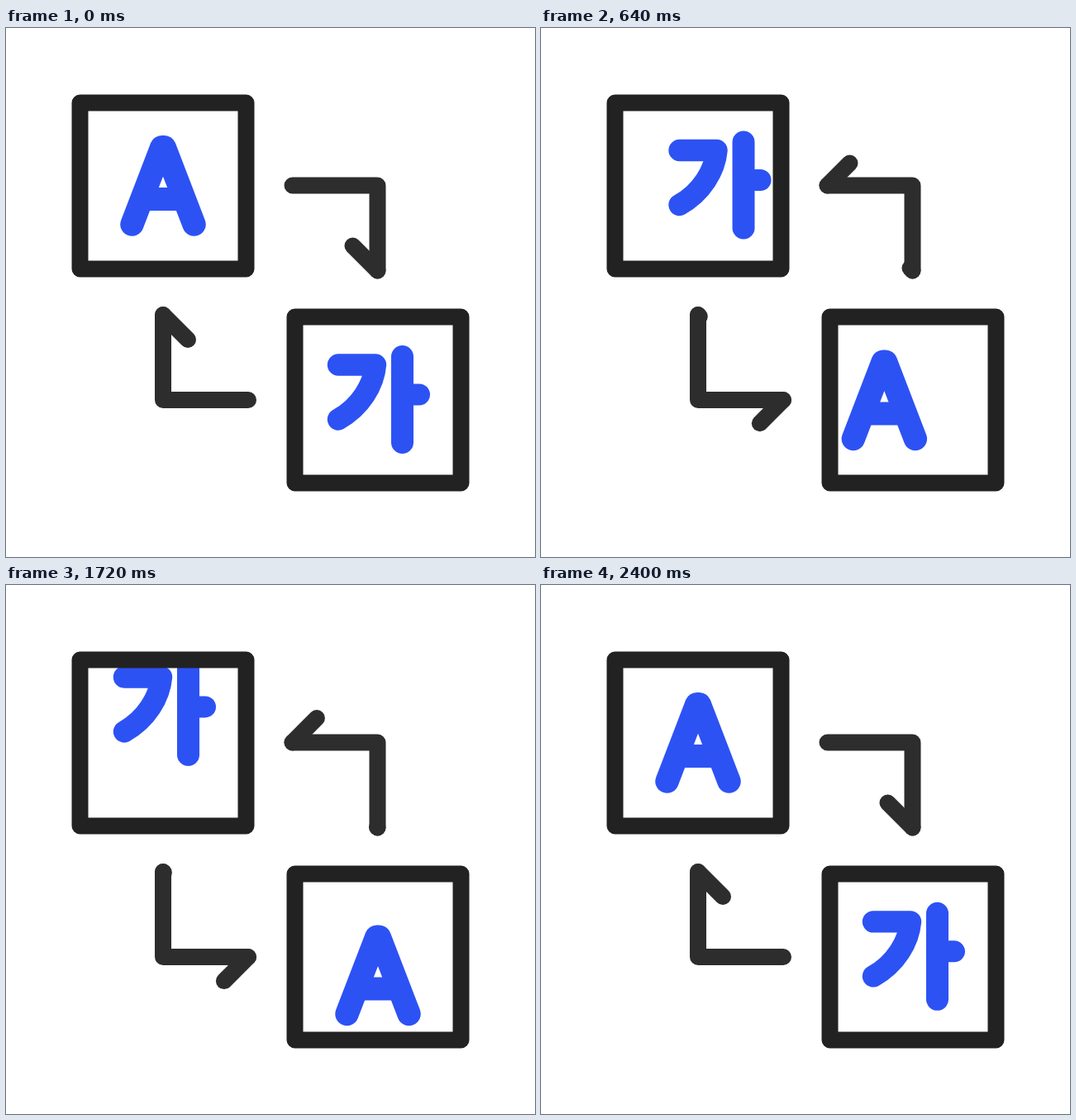
An HTML page with a canvas for the animation above (2800 ms loop, 640 by 640 pixels).

```html
<!DOCTYPE html>
<html lang="en">
<head>
<meta charset="utf-8">
<title>Translate</title>
<style>
html, body { margin: 0; width: 100%; height: 100%; overflow: hidden; background: #fff; }
canvas { display: block; width: 640px; height: 640px; }
</style>
</head>
<body>
<canvas id="stage" width="640" height="640"></canvas>
<script>
const ctx = document.getElementById('stage').getContext('2d');
const LOOP = 2800, STEP = 40;
const BLUE = '#2d52f4', FRAME = '#222222', ARROW = '#2d2d2d';

// Ease with control points (x1, 0) and (x2, 1), running from start to end
function ease(time, start, end, x1, x2) {
  const x = (time - start) / (end - start);
  if (x <= 0) return 0;
  if (x >= 1) return 1;
  let lo = 0, hi = 1;
  for (let i = 0; i < 30; i++) {
    const u = (lo + hi) / 2, v = 1 - u;
    if (3 * v * v * u * x1 + 3 * v * u * u * x2 + u * u * u < x) lo = u; else hi = u;
  }
  return lo * lo * (3 - 2 * lo);
}

function line(width, ...pts) {
  ctx.lineWidth = width;
  ctx.beginPath();
  for (let i = 0; i < pts.length; i += 2) ctx.lineTo(pts[i], pts[i + 1]);
  ctx.stroke();
}

function at(x, y, draw) {
  ctx.save();
  ctx.translate(x, y);
  draw();
  ctx.restore();
}

// Latin letter, placed by the middle of its top edge
function latin() {
  line(28.5, -37.5, 107.5, -1.6, 14.2, 1.6, 14.2, 37.5, 107.5);
  line(28, -16, 77, 16, 77);
}

// Hangul syllable, placed by the left end of its top stroke
function hangul() {
  ctx.lineWidth = 26.4;
  ctx.beginPath();
  ctx.moveTo(0, 0);
  ctx.lineTo(45, 0);
  ctx.bezierCurveTo(43, 24, 27, 51, 0, 66);
  ctx.stroke();
  line(27, 77.5, -10, 77.5, 94);
  line(26, 78, 36, 98, 36);
}

function box(x, y, drawLetters) {
  ctx.save();
  ctx.beginPath();
  ctx.rect(x, y, 201, 201);
  ctx.clip();
  ctx.strokeStyle = BLUE;
  drawLetters();
  ctx.restore();
  ctx.strokeStyle = FRAME;
  ctx.lineWidth = 20;
  ctx.strokeRect(x, y, 201, 201);
}

function head(x, y, dx, dy, size) {
  if (size > 0) line(20, x, y, x + dx * size, y + dy * size);
}

function render(t) {
  ctx.fillStyle = '#fff';
  ctx.fillRect(0, 0, 640, 640);
  ctx.lineCap = ctx.lineJoin = 'round';

  const out1 = ease(t, 0, 1120, 0.75, 0.04);
  const out2 = ease(t, 40, 1160, 0.686, 0.0625);
  const back1 = ease(t, 1420, 2420, 0.6, 0.145);
  const back2 = ease(t, 1440, 2440, 0.656, 0.154);
  const second = t >= 1400;

  box(89.5, 90.5, () => {
    const ax = second ? 0 : -192 * out1, ay = second ? 208 * (1 - back1) : 0;
    const hx = second ? 0 : 192 * (1 - out1), hy = second ? -208 * back1 : 0;
    at(190 + ax, 130 + ay, latin);
    at(143 + hx, 148 + hy, hangul);
  });
  box(349.5, 349.5, () => {
    const ax = second ? 0 : -208 * (1 - out2), ay = second ? 200 * back2 : 0;
    const hx = second ? 0 : 208 * out2, hy = second ? -200 * (1 - back2) : 0;
    at(450 + ax, 389.5 + ay, latin);
    at(402 + hx, 407.5 + hy, hangul);
  });

  const upper = ease(t, 201, 901, 0.75, 0.1) - ease(t, 1598, 2385, 0.75, 0.1);
  const lower = ease(t, 156, 856, 0.75, 0.1) - ease(t, 1570, 2357, 0.75, 0.1);
  ctx.strokeStyle = ARROW;
  line(20, 346.5, 190.5, 449.5, 190.5, 449.5, 293.5);
  head(449.5, 293.5, -30, -30, 1 - upper);
  head(346.5, 190.5, 30, -30, upper);
  line(20, 190, 347, 190, 450, 293, 450);
  head(190, 347, 30, 30, 1 - lower);
  head(293, 450, -30, 30, lower);
}

const begin = performance.now();
function tick() {
  const t = (performance.now() - begin) % LOOP;
  render(Math.floor(t / STEP) * STEP);
  requestAnimationFrame(tick);
}
tick();
</script>
</body>
</html>
```
